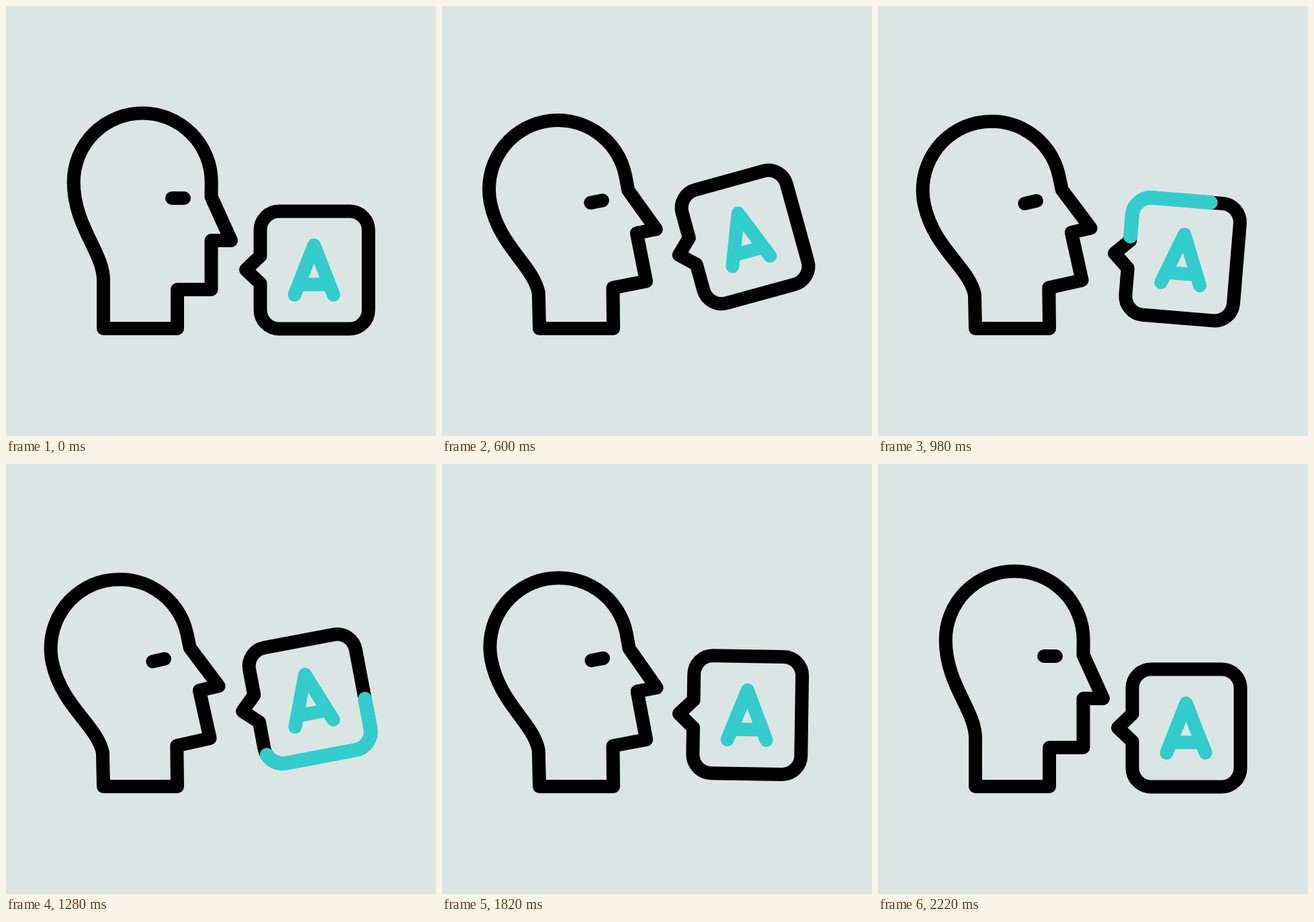
Write an HTML page with a canvas that moves like this. It is 640 px wide and 640 px high and loops after 2.4 s.

```html
<!DOCTYPE html>
<html lang="en">
<head>
<meta charset="utf-8">
<title>Talking head</title>
<style>
html, body { margin: 0; height: 100%; overflow: hidden; background: #dbe5e3; }
canvas { display: block; }
</style>
</head>
<body>
<canvas id="stage" width="640" height="640"></canvas>
<script>
const ctx = document.getElementById('stage').getContext('2d');
const LOOP = 2400, STEP = 20, TEAL = '#33cccc', OUTLINE = 642.4;

// Keys are [time, value] pairs, eased in and out between neighbours.
const LEAN = [[200, 0], [700, 1], [1700, 1], [2200, 0]];
const SWING = [[200, 0], [700, -17.2], [1000, 5], [1300, -10.9], [1600, 5], [1900, 0]];
const TRIM_END = [[700, 0], [1500, 1]];
const TRIM_START = [[900, 0], [1700, 1]];

// The bubble outline runs counterclockwise from the top right corner.
const bubble = new Path2D(`M511.5 305.5H406.5A28 28 0 0 0 378.5 333.5V372L357 392.5 378.5 413V452.5
  A28 28 0 0 0 406.5 480.5H511.5A28 28 0 0 0 539.5 452.5V333.5A28 28 0 0 0 511.5 305.5`);
const letter = new Path2D('M429.5 430L458.5 356 487.5 430M435.6 414.5H481.4');
const eye = new Path2D('M247 286H265');

function ease(keys, t) {
  let [t0, v0] = keys[0];
  for (const [t1, v1] of keys) {
    if (t < t1) {
      const u = Math.max(0, (t - t0) / (t1 - t0));
      return v0 + (v1 - v0) * u * u * (3 - 2 * u);
    }
    [t0, v0] = [t1, v1];
  }
  return v0;
}

function turn(x, y, degrees) {
  ctx.translate(x, y);
  ctx.rotate(degrees * Math.PI / 180);
  ctx.translate(-x, -y);
}

function stroke(path, color) {
  ctx.strokeStyle = color;
  ctx.stroke(path);
}

// The neck base stays put while everything above it tilts.
function drawHead(lean) {
  ctx.save();
  ctx.beginPath();
  ctx.moveTo(255, 480);
  ctx.lineTo(145, 480);
  turn(241.6, 423.7, -12.5 * lean);
  ctx.lineTo(145, 408);
  ctx.bezierCurveTo(145, 366, 100.7, 328, 100.7, 262);
  ctx.arc(203.2, 262, 102.5, Math.PI, 0);
  for (const [x, y] of [[305.5, 284], [335, 349], [305.5, 349], [305.5, 422], [255, 422]]) {
    ctx.lineTo(x, y);
  }
  ctx.restore();
  ctx.closePath();
  ctx.strokeStyle = '#000';
  ctx.stroke();
}

// The eye tilts with the head and also slides down the face.
function drawEye(lean) {
  ctx.save();
  turn(241.6, 423.7, -12.5 * lean);
  ctx.translate(0, 6 * lean);
  stroke(eye, '#000');
  ctx.restore();
}

function drawBubble(t, lean) {
  const start = ease(TRIM_START, t) * OUTLINE;
  const end = ease(TRIM_END, t) * OUTLINE;
  ctx.save();
  ctx.translate(-5 * lean, -24.5 * lean);
  turn(357, 392.5, ease(SWING, t));
  stroke(bubble, '#000');
  stroke(letter, TEAL);
  if (end > start) {
    ctx.lineWidth = 21; // hides the dark edge beneath
    ctx.setLineDash([end - start, 999]);
    ctx.lineDashOffset = -start;
    stroke(bubble, TEAL);
  }
  ctx.restore();
}

function draw() {
  const t = Math.floor(performance.now() % LOOP / STEP) * STEP;
  const lean = ease(LEAN, t);
  ctx.fillStyle = '#dbe5e3';
  ctx.fillRect(0, 0, 640, 640);
  ctx.lineWidth = 20;
  ctx.lineCap = ctx.lineJoin = 'round';
  drawHead(lean);
  drawEye(lean);
  drawBubble(t, lean);
  requestAnimationFrame(draw);
}
draw();
</script>
</body>
</html>
```
